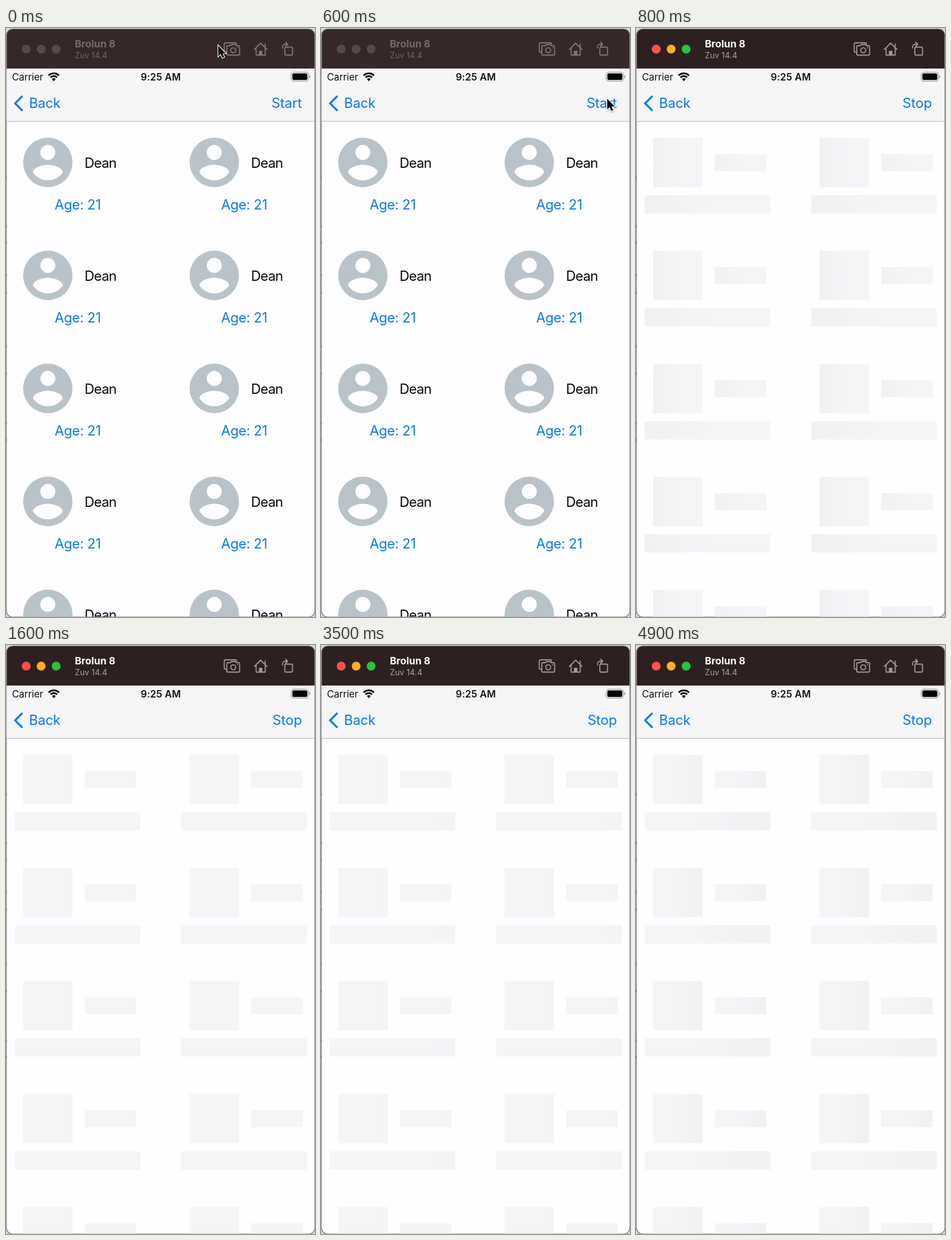
Write an HTML page with a canvas that moves like this. It is 543 px wide and 1032 px high and loops after 5 s.

```html
<!DOCTYPE html>
<html lang="en">
<head>
<meta charset="utf-8">
<title>Skeleton loading</title>
<style>
  html, body { margin: 0; width: 100%; height: 100%; overflow: hidden; background: #fefdff; }
  canvas { display: block; width: 543px; height: 1032px; }
</style>
</head>
<body>
<canvas id="stage" width="543" height="1032"></canvas>
<script>
const W = 543, H = 1032, LOOP = 5000, STEP = 100;
const ACTIVE_AT = 700, LOADING_AT = 800;
const SHIMMER = 490, SHIMMER_OFFSET = 0.815;
const ROWS = 5, ROW_H = 198, COL_W = 292.5;
const BLUE = '#0878f0', PAPER = '#fefdff', BAR = '#f6f5f8';
const FONT = 'Inter, "Liberation Sans", sans-serif';
const ctx = document.getElementById('stage').getContext('2d');

const person = new Path2D('M12 19.2c-2.5 0-4.71-1.28-6-3.22.03-1.99 4-3.08 6-3.08 1.99 0 5.97 1.09 6 3.08-1.29 1.94-3.5 3.22-6 3.22z');
const pointer = new Path2D('M0 0V18.5L4.3 14.6L7.2 21.3L10.4 19.9L7.5 13.4H13.2Z');
const icons = [
  // camera
  'M387.5 42.5H386a2.5 2.5 0 0 1-2.5-2.5V28.5a2.5 2.5 0 0 1 2.5-2.5H403a2 2 0 0 1 2 2',
  'M390 31h4l2-2h7l2 2h3.5a2 2 0 0 1 2 2V45.5a2 2 0 0 1-2 2H390a2 2 0 0 1-2-2V33a2 2 0 0 1 2-2Z',
  'M403.7 39a4.4 4.4 0 1 1-8.8 0a4.4 4.4 0 1 1 8.8 0Z',
  // home
  'M436.5 37.5L447.5 26.5L458.5 37.5M439.5 35.5V47.5H455.5V35.5M455.5 33V28',
  // rotate
  'M492 33.5H501.500a2 2 0 0 1 2 2V45.500a2 2 0 0 1-2 2H492a2 2 0 0 1-2-2V35.500a2 2 0 0 1 2-2Z',
  'M486 35V33a4.500 4.500 0 0 1 4.500-4.500H494M491.500 25L495 28.500L491.500 32'
].map(d => new Path2D(d));
const door = new Path2D('M444.5 48V40H450.5V48Z');

function text(str, x, y, size, color, { weight = 400, align = 'left', track = 0 } = {}) {
  ctx.font = `${weight} ${size}px ${FONT}`;
  ctx.letterSpacing = track + 'px';
  ctx.textAlign = align;
  ctx.fillStyle = color;
  ctx.fillText(str, x, y);
}

function rect(x, y, w, h, color) {
  ctx.fillStyle = color;
  ctx.fillRect(x, y, w, h);
}

function disc(x, y, r, color) {
  ctx.fillStyle = color;
  ctx.beginPath();
  ctx.arc(x, y, r, 0, Math.PI * 2);
  ctx.fill();
}

function rounded(x, y, w, h, r) {
  ctx.beginPath();
  ctx.roundRect(x, y, w, h, r);
}

// cubic-bezier(.42, 0, 1, 1)
function easeIn(x) {
  let lo = 0, hi = 1;
  for (let i = 0; i < 20; i++) {
    const s = (lo + hi) / 2, r = 1 - s;
    if (1.26 * r * r * s + 3 * r * s * s + s ** 3 < x) lo = s; else hi = s;
  }
  return lo * lo * (3 - 2 * lo);
}

function titleBar(active) {
  rect(1, 2, 541, 69, active ? '#2d2021' : '#362829');
  const lights = active ? ['#ff524c', '#fdaf28', '#27c53d'] : Array(3).fill('#57494b');
  lights.forEach((c, i) => disc(35.5 + i * 26.3, 37, 7.8, c));
  text('Brolun 8', 121, 34, 17.5, active ? '#ffffff' : '#76696b', { weight: 700 });
  text('Zuv 14.4', 121, 52.5, 14, active ? '#aea4a5' : '#74676a', { track: 0.1 });
  const ink = active ? '#a59a9c' : '#85797b';
  ctx.strokeStyle = ctx.fillStyle = ink;
  ctx.lineWidth = 1.8;
  ctx.lineJoin = ctx.lineCap = 'round';
  icons.forEach(p => ctx.stroke(p));
  ctx.fill(door);
  disc(407, 34.5, 1.1, ink);
}

function statusBar() {
  text('Carrier', 10.5, 92, 17, '#111', { track: -0.1 });
  text('9:25 AM', 272, 92, 17, '#111', { weight: 600, align: 'center', track: 0.1 });

  ctx.strokeStyle = '#050505';
  ctx.lineCap = 'butt';
  ctx.lineWidth = 3;
  for (const r of [13, 8.2]) {
    ctx.beginPath();
    ctx.arc(84, 92.5, r, -Math.PI * 0.75, -Math.PI * 0.25);
    ctx.stroke();
  }
  ctx.fillStyle = '#050505';
  ctx.beginPath();
  ctx.moveTo(84, 93.5);
  ctx.arc(84, 92.5, 4.6, -Math.PI * 0.75, -Math.PI * 0.25);
  ctx.fill();

  ctx.strokeStyle = '#a09fa2';
  ctx.lineWidth = 1.3;
  rounded(501.2, 77.4, 30.4, 15.6, 4.5);
  ctx.stroke();
  ctx.fillStyle = '#050505';
  rounded(503.2, 79.4, 26.4, 11.6, 2.8);
  ctx.fill();
  ctx.fillStyle = '#a09fa2';
  rounded(533, 82.700, 1.7, 5, 1);
  ctx.fill();
}

function navBar(action) {
  rect(1, 71, 541, 92, BAR);
  statusBar();
  ctx.strokeStyle = BLUE;
  ctx.lineWidth = 3.3;
  ctx.lineCap = 'round';
  ctx.lineJoin = 'miter';
  ctx.beginPath();
  ctx.moveTo(28, 120);
  ctx.lineTo(16, 132);
  ctx.lineTo(28, 144);
  ctx.stroke();
  text('Back', 40.5, 140, 24, BLUE, { track: -0.2 });
  text(action, 520, 140, 24, BLUE, { align: 'right', track: -0.1 });
  rect(1, 163, 541, 1.2, '#bfbec1');
}

function profile(x, y) {
  disc(x + 73.5, y + 235.5, 43.4, '#b9c3c9');
  disc(x + 73.5, y + 218, 13.2, PAPER);
  ctx.save();
  ctx.translate(x + 21.3, y + 183.5);
  ctx.scale(4.35, 4.35);
  ctx.fill(person);
  ctx.restore();
  text('Dean', x + 138, y + 244.5, 24, '#0b0b0c', { track: -0.8 });
  text('Age: 21', x + 126, y + 318, 24, BLUE, { align: 'center', track: -0.3 });
}

function bone(x, y, w, h, mid) {
  const g = ctx.createLinearGradient(x + w * (mid - 0.5), 0, x + w * (mid + 0.5), 0);
  g.addColorStop(0, '#f5f4f7');
  g.addColorStop(0.5, '#f1f0f2');
  g.addColorStop(1, '#f5f4f7');
  rect(x, y, w, h, g);
}

function skeleton(x, y, mid) {
  bone(x + 30, y + 192.5, 87, 86.5, mid);
  bone(x + 138.5, y + 221, 90.5, 30, mid);
  bone(x + 15.5, y + 293, 220.5, 32, mid);
}

function cursor(t) {
  const mix = (a, b, k) => a + (b - a) * k;
  const out = k => 1 - (1 - k) ** 2;
  const go = out(Math.min(t / 300, 1));
  const back = out(Math.max(0, Math.min((t - 300) / 300, 1)));
  ctx.save();
  ctx.translate(mix(mix(373, 518.5, go), 503, back), mix(mix(31, 128, go), 124, back));
  ctx.shadowColor = 'rgba(0,0,0,.3)';
  ctx.shadowBlur = 3;
  ctx.shadowOffsetY = 1.5;
  ctx.lineJoin = 'miter';
  ctx.lineWidth = 2.4;
  ctx.strokeStyle = '#fff';
  ctx.stroke(pointer);
  ctx.shadowColor = 'transparent';
  ctx.fillStyle = '#000';
  ctx.fill(pointer);
  ctx.restore();
}

function backdrop() {
  rect(0, 0, W, H, '#d9d8da');
  for (const y of [260, 345, 374, 431, 462, 556, 604, 691, 720]) rect(0, y, 1, 4, '#4a4a4c');
  ctx.fillStyle = '#5d5658';
  rounded(0.5, 1.5, 542.5, 1031, 11);
  ctx.fill();
}

function draw(t) {
  const loading = t >= LOADING_AT;
  backdrop();
  ctx.save();
  rounded(1.3, 2, 541, 1029.5, 10.5);
  ctx.clip();
  rect(0, 0, W, H, PAPER);
  const mid = 2 * easeIn((t / SHIMMER + SHIMMER_OFFSET) % 1) - 0.5;
  for (let row = 0; row < ROWS; row++) {
    for (let col = 0; col < 2; col++) {
      const x = col * COL_W, y = row * ROW_H;
      if (loading) skeleton(x, y, mid); else profile(x, y);
    }
  }
  navBar(loading ? 'Stop' : 'Start');
  titleBar(t >= ACTIVE_AT);
  ctx.restore();
  if (!loading) cursor(t);
}

const start = performance.now();
function tick() {
  const t = (performance.now() - start) % LOOP;
  draw(Math.floor(t / STEP) * STEP);
  requestAnimationFrame(tick);
}
tick();
</script>
</body>
</html>
```
